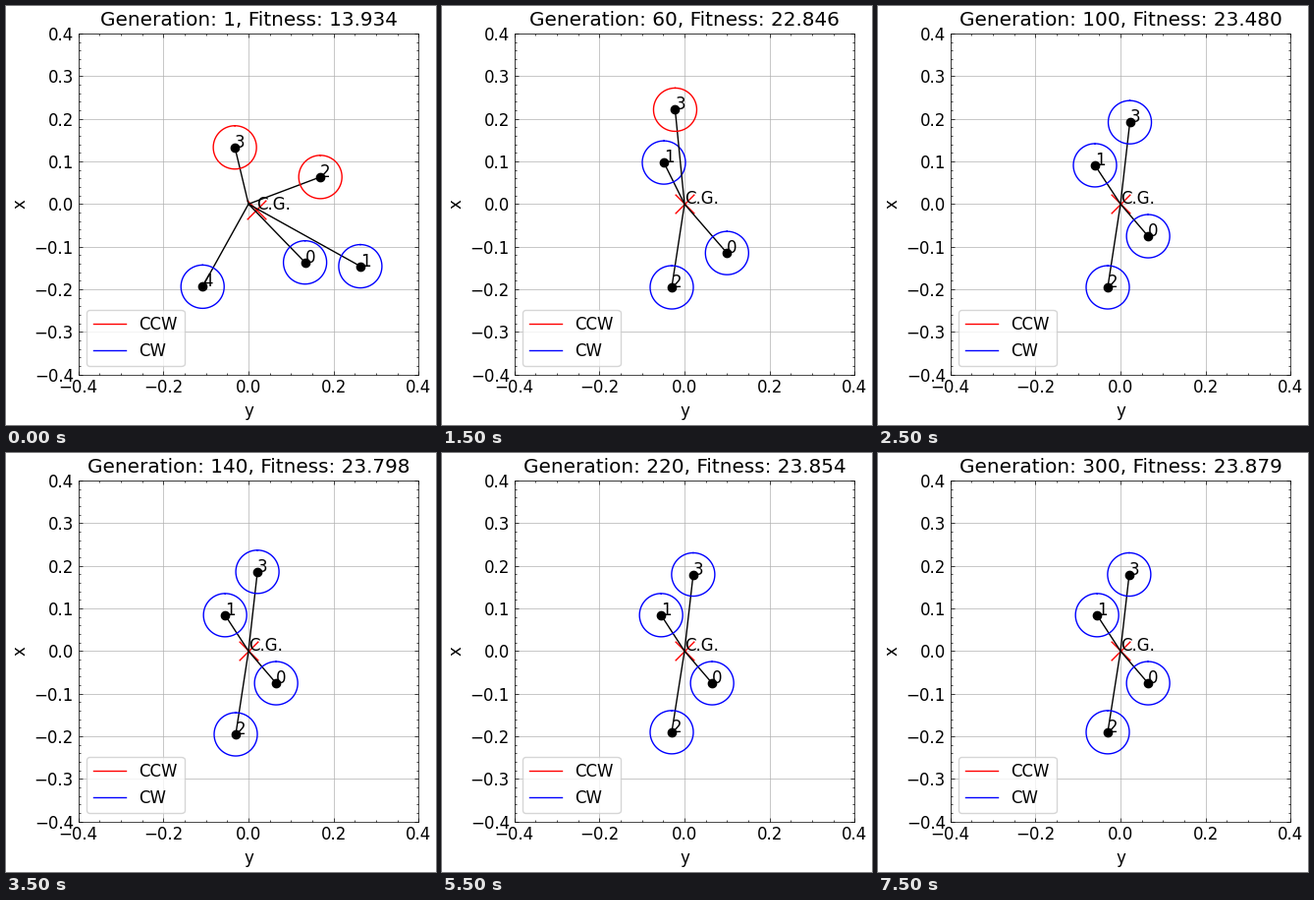
These frames come from a looping animation (438 px wide and 426 px high, 8000 ms). A matplotlib script:

```python
import numpy as np
import matplotlib.pyplot as plt
from matplotlib.animation import FuncAnimation
from matplotlib.ticker import MultipleLocator

W, H, DPI = 438, 426, 100
SIDE = 346.5
PROP_RADIUS = 0.0508
CG_RATIO = 0.23
SPIN = {"+": "red", "-": "blue"}

plt.rcParams.update({
    "font.family": "DejaVu Sans",
    "font.size": 12,
    "lines.linewidth": 1.0,
    "axes.linewidth": 0.5,
    "grid.linewidth": 0.5,
    "axes.axisbelow": True,
})
for side in ("xtick", "ytick"):
    plt.rcParams.update({
        f"{side}.direction": "in",
        f"{side}.major.size": 3,
        f"{side}.major.width": 0.5,
        f"{side}.minor.size": 1.5,
        f"{side}.minor.width": 0.5,
    })
plt.rcParams.update({"xtick.top": True, "ytick.right": True})

# Rotor layouts: (horizontal, vertical) positions and spin directions
R0, R0_IN = (0.100, -0.115), (0.065, -0.0755)
R1, R1_MID, R1_IN = (-0.0485, 0.0975), (-0.060, 0.091), (-0.055, 0.0843)
R2, R2_IN = (-0.030, -0.1955), (-0.030, -0.1905)

FIRST = ([(0.133, -0.137), (0.263, -0.146), (0.169, 0.0635),
          (-0.032, 0.133), (-0.108, -0.194)], "--++-")
WIDE = ([R0, R1, R2, (-0.067, 0.248)], "---+")
CLOSER = ([R0, R1, R2, (-0.023, 0.238)], "---+")
NARROW = ([R0, R1, R2, (-0.022, 0.2215)], "---+")
ALL_CW = ([R0_IN, R1_MID, R2, (0.022, 0.192)], "----")
TIGHT = ([R0_IN, R1_IN, R2, (0.021, 0.186)], "----")
FINAL = ([R0_IN, R1_IN, R2_IN, (0.0205, 0.1797)], "----")

STEPS = [
    (1, 13.934, FIRST), (20, 20.222, WIDE), (40, 22.518, CLOSER),
    (60, 22.846, NARROW), (80, 23.457, ALL_CW), (100, 23.480, ALL_CW),
    (120, 23.714, TIGHT), (140, 23.798, TIGHT), (160, 23.817, TIGHT),
    (180, 23.817, TIGHT), (200, 23.824, TIGHT), (220, 23.854, FINAL),
    (240, 23.863, FINAL), (260, 23.874, FINAL), (280, 23.874, FINAL),
    (300, 23.879, FINAL),
]

fig = plt.figure(figsize=(W / DPI, H / DPI), dpi=DPI, facecolor="white")
ax = fig.add_axes([73.75 / W, 51.4 / H, SIDE / W, SIDE / H])
ax.set(xlim=(-0.4, 0.4), ylim=(-0.4, 0.4), xlabel="y", ylabel="x")
ax.xaxis.set_major_locator(MultipleLocator(0.2))
ax.xaxis.set_minor_locator(MultipleLocator(0.05))
ax.yaxis.set_major_locator(MultipleLocator(0.1))
ax.yaxis.set_minor_locator(MultipleLocator(0.02))
ax.grid(True)
title = ax.set_title("")

ax.plot([], [], color="red", label="CCW")
ax.plot([], [], color="blue", label="CW")
ax.legend(loc="lower left")

theta = np.linspace(0, 2 * np.pi, 100)
ring_x, ring_y = PROP_RADIUS * np.sin(theta), PROP_RADIUS * np.cos(theta)
drawn = []


def draw_rotor(index, x, y, color):
    drawn.extend(ax.plot([0, x], [0, y], color="black"))
    drawn.extend(ax.plot(x + ring_x, y + ring_y, color=color))
    drawn.extend(ax.plot(x, y, "o", color="black", markersize=6))
    drawn.append(ax.text(x, y, str(index)))


def update(i):
    while drawn:
        drawn.pop().remove()
    generation, fitness, (rotors, spins) = STEPS[i]
    title.set_text(f"Generation: {generation}, Fitness: {fitness:.3f}")
    cg = CG_RATIO * np.mean(rotors, axis=0)
    drawn.append(ax.scatter(*cg, s=200, marker="x", color="red", linewidths=1.0))
    drawn.append(ax.text(*cg, "C.G."))
    for index, ((x, y), spin) in enumerate(zip(rotors, spins)):
        draw_rotor(index, x, y, SPIN[spin])
    return drawn


anim = FuncAnimation(fig, update, frames=len(STEPS), interval=500,
                     repeat=True, repeat_delay=0, blit=False)
plt.show()
```
